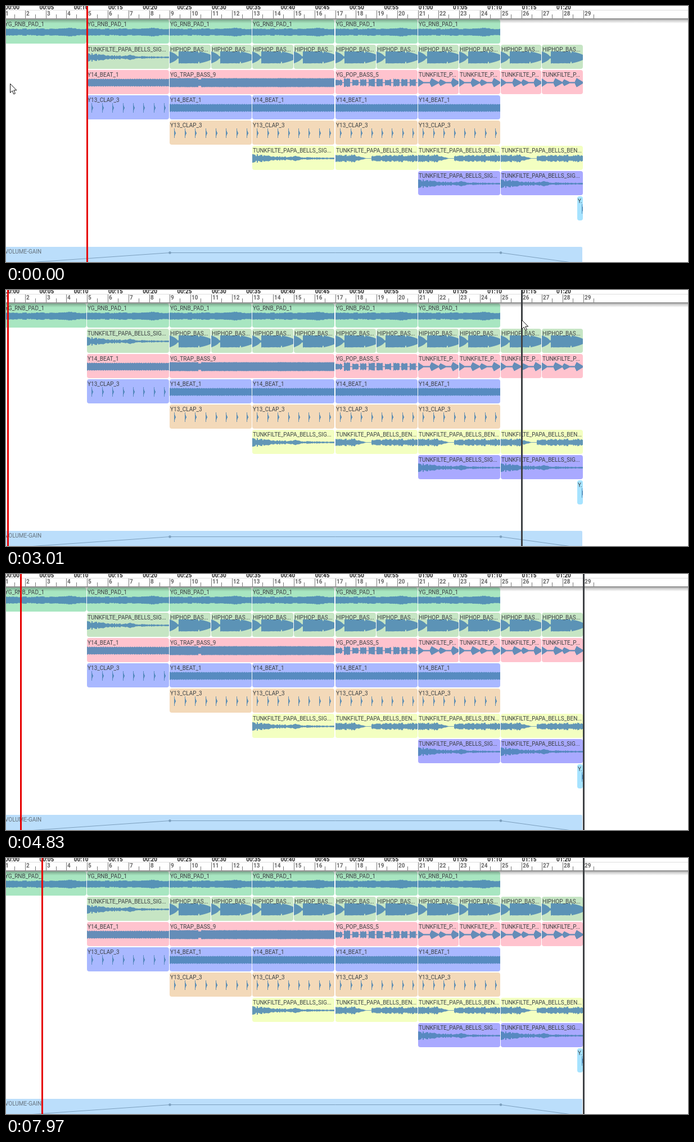
Recreate the animation shown at these times as an HTML page with a canvas. Size 1213 by 456 pixels, loop 8 s.

```html
<!DOCTYPE html>
<html>
<head>
<meta charset="utf-8">
<style>
  html, body { margin: 0; width: 100%; height: 100%; overflow: hidden; background: #fff; }
  canvas { display: block; }
</style>
</head>
<body>
<canvas id="stage" width="1213" height="456"></canvas>
<script>
const W = 1213, H = 456, LOOP = 8000, STEP = 70;
const BAR = 36.78, ORIGIN = -2.9, PX_PER_MS = BAR / 3000;
const barX = bar => ORIGIN + (bar - 1) * BAR;

const noise = n => {
  const s = Math.sin(n * 127.1 + 11.7) * 43758.5453;
  return s - Math.floor(s);
};
const bump = (x, centre, width) => Math.exp(-(((x - centre) / width) ** 2));
const decay = (x, start, length, height) =>
  x < start || x > start + length ? 0 : height * (1 - (x - start) / length);
// A short rise into a straight fall.
const pluck = (x, start, length, height) =>
  Math.min(decay(x, start, length, height), (x - start + 1) * height / 4);

// Half height of each waveform at x pixels from the clip's left edge.
const waves = {
  pad: x => 4.4 + 1.6 * noise(x >> 3) + 0.8 * noise(x >> 1) + 1.1 * bump(x, 118, 14),
  sig: x => (6 * Math.exp(-x / 40) + 2.8 * bump(x, 77, 7) + 1.4) * (0.6 + 0.6 * noise(x >> 1)),
  ben: x => {
    if (x > 53 && x < 64) return 0.4;
    const lump = 3 + 2.6 * noise(x >> 2) + 1.8 * noise(x);
    return x < 54 ? lump * Math.min(1, (55 - x) / 22) : lump * (x > 135 ? 1.15 : 0.95);
  },
  bells: x => 1.2 + Math.max(decay(x, 0, 9, 6), pluck(x, 21, 15, 8),
    pluck(x, 37, 12, 6), pluck(x, 59, 14, 8.5)),
  hiphop: x => x < 14 ? 10.5 * Math.sqrt(1 - x / 14)
    : x < 16 ? 2 : x < 51 ? 10.3 + noise(x >> 1) * 0.5
    : x < 53 ? 8 : 10.5 * Math.sqrt(Math.max(0.1, 1 - (x - 53) / 24)),
  beat: x => 6 + (x % 4 < 2 ? 0.6 : 0) + noise(x) * 0.5,
  trap: x => x > 50 && x < 56 ? 5.8 : 7.2 + (x % 3 ? 0.6 : 0) + noise(x >> 2) * 0.4,
  pop: x => x % 14.6 > 11 ? 0.7
    : (5 + 2.4 * noise(Math.floor(x / 14.6) + 3)) * (0.75 + 0.3 * noise(x >> 1)),
  clap: x => {
    const p = (x - 8) % 18.4;
    return x < 8 ? 0 : p < 1 ? 8.5 : p < 2 ? 4 : p < 3 ? 1.5 : 0;
  }
};

const SIG = "TUNKFILTE_PAPA_BELLS_SIG...", BEN = "TUNKFILTE_PAPA_BELLS_BEN...";
// Each run of clips: first bar, bars per clip, how many, label, waveform.
const tracks = [
  ["#a8e6c1", [1, 4, 6, "YG_RNB_PAD_1", "pad"]],
  ["#c6e5c4", [5, 4, 1, SIG, "sig"], [9, 2, 10, "HIPHOP_BAS...", "hiphop"]],
  ["#ffc3ce", [5, 4, 1, "Y14_BEAT_1", "beat"], [9, 8, 1, "YG_TRAP_BASS_9", "trap"],
    [17, 4, 1, "YG_POP_BASS_5", "pop"], [21, 2, 4, "TUNKFILTE_P...", "bells"]],
  ["#a9b8ff", [5, 4, 1, "Y13_CLAP_3", "clap"], [9, 4, 4, "Y14_BEAT_1", "beat"]],
  ["#f3d9b9", [9, 4, 4, "Y13_CLAP_3", "clap"]],
  ["#f3ffc1", [13, 4, 1, SIG, "sig"], [17, 4, 3, BEN, "ben"]],
  ["#a9a9ff", [21, 4, 2, SIG, "sig"]],
  ["#a6e3ff", [28.71, 0.29, 1, "Y.", "clap"]]
];

function drawClip(c, bar, bars, y, colour, label, wave) {
  const x = Math.round(barX(bar)), width = Math.round(barX(bar + bars) - 1.2) - x;
  c.save();
  c.beginPath();
  c.roundRect(x, y, width, 43, 4);
  c.fillStyle = colour;
  c.fill();
  c.clip();
  c.fillStyle = "rgba(70,130,180,.83)";
  for (let i = 0; i < width; i++) {
    const a = wave(i);
    if (a) c.fillRect(x + i, y + 22.5 - a, 1, 2 * a);
  }
  c.fillStyle = "#3c4144";
  c.fillText(label, x + 1, y + 12);
  c.restore();
}

function drawRuler(c) {
  c.fillStyle = "#fff";
  c.fillRect(0, 0, W, 22);
  c.font = "bold 10px Roboto, sans-serif";
  c.fillStyle = "#222";
  for (let k = 0; k <= 16; k++) {
    const s = k * 5, two = n => String(n).padStart(2, "0");
    c.fillText(two(Math.floor(s / 60)) + ":" + two(s % 60), ORIGIN + 1 + s * 1000 * PX_PER_MS, 6);
  }
  c.fillStyle = "#ddd";
  c.fillRect(0, 7, W, 1);
  for (let bar = 1; bar <= 29; bar++) {
    const x = Math.round(barX(bar));
    c.fillStyle = "#777";
    c.fillRect(x, 8, 1, 14);
    c.fillRect(x + 18, 15, 1, 7);
    c.fillStyle = "#666";
    c.fillText(bar, x + 2, 17);
  }
  const shade = c.createLinearGradient(0, 22, 0, 31);
  shade.addColorStop(0, "rgba(0,0,0,.5)");
  shade.addColorStop(0.4, "rgba(0,0,0,.2)");
  shade.addColorStop(1, "rgba(0,0,0,0)");
  c.fillStyle = shade;
  c.fillRect(0, 22, W, 9);
}

function drawVolume(c) {
  c.fillStyle = "#bbdefb";
  c.beginPath();
  c.roundRect(-5, 429, 1030, 40, 2);
  c.fill();
  c.fillStyle = "#66727c";
  c.fillText("VOLUME-GAIN", -2, 441);
  c.strokeStyle = c.fillStyle = "#7c9fbd";
  c.beginPath();
  [[40, 457], [291.5, 439.5], [880, 439.5], [1006, 457]].forEach(p => c.lineTo(...p));
  c.stroke();
  for (const x of [291.5, 880]) {
    c.beginPath();
    c.arc(x, 439.5, 2.3, 0, 7);
    c.fill();
  }
}

function drawBackdrop() {
  const layer = document.createElement("canvas");
  layer.width = W;
  layer.height = H;
  const c = layer.getContext("2d");
  c.fillStyle = "#fff";
  c.fillRect(0, 0, W, H);
  c.font = "10px Roboto, sans-serif";
  tracks.forEach(([colour, ...runs], row) => {
    for (const [first, bars, count, label, wave] of runs)
      for (let i = 0; i < count; i++)
        drawClip(c, first + i * bars, bars, 24 + row * 45, colour, label, waves[wave]);
  });
  drawVolume(c);
  drawRuler(c);
  return layer;
}

// Linear interpolation over keys [time, ...values]; null outside their span.
function at(keys, t) {
  const i = keys.findIndex(k => k[0] > t);
  if (i < 1) return null;
  const [a, b] = [keys[i - 1], keys[i]], u = (t - a[0]) / (b[0] - a[0]);
  return a.slice(1).map((v, j) => v + (b[j + 1] - v) * u);
}

const hoverKeys = [[1400, 71], [1470, 208], [1540, 480], [1610, 760], [1680, 1027], [2610, 1027],
  [2800, 950], [3010, 917], [3080, 917], [3350, 960], [3430, 1027], [LOOP + 1, 1027]];
const pointerKeys = [
  [[0, 7, 138], [1400, 7, 138]],
  [[1400, 208, 122], [1470, 480, 85], [1540, 760, 55], [1610, 1000, 30], [1680, 1150, 10], [1740, 1165, -22]],
  [[2610, 985, -22], [2800, 950, 20], [3010, 917, 53], [3080, 917, 53], [3350, 960, -22]]
];

function playheadX(t) {
  if (t < 2000) return 144.5 - 147.5 * Math.min(4, Math.floor(t / 67)) / 4;
  return ORIGIN + Math.max(0, t - 2458) * PX_PER_MS;
}

const ctx = document.getElementById("stage").getContext("2d");
const backdrop = drawBackdrop();
const arrow = new Path2D("M.5.5V16.5L4.2 13L6.8 19L9.4 17.9L6.8 12H11.8Z");

function drawLine(x, colour) {
  ctx.fillStyle = colour;
  ctx.fillRect(Math.round(x - 1.5), 0, 3, H);
}

function drawPointer(x, y) {
  ctx.save();
  ctx.translate(Math.round(x), Math.round(y));
  ctx.fillStyle = "#fff";
  ctx.strokeStyle = "#111";
  ctx.fill(arrow);
  ctx.stroke(arrow);
  ctx.restore();
}

function frame(now) {
  const t = now % LOOP;
  const held = Math.floor(t / STEP) * STEP; // the mouse is sampled in steps
  ctx.drawImage(backdrop, 0, 0);
  const hover = at(hoverKeys, held);
  if (hover) drawLine(hover[0] + 0.5, "#3e4144");
  drawLine(playheadX(t), "#e60000");
  for (const keys of pointerKeys) {
    const p = at(keys, held);
    if (p) drawPointer(...p);
  }
  requestAnimationFrame(frame);
}
requestAnimationFrame(frame);
</script>
</body>
</html>
```
